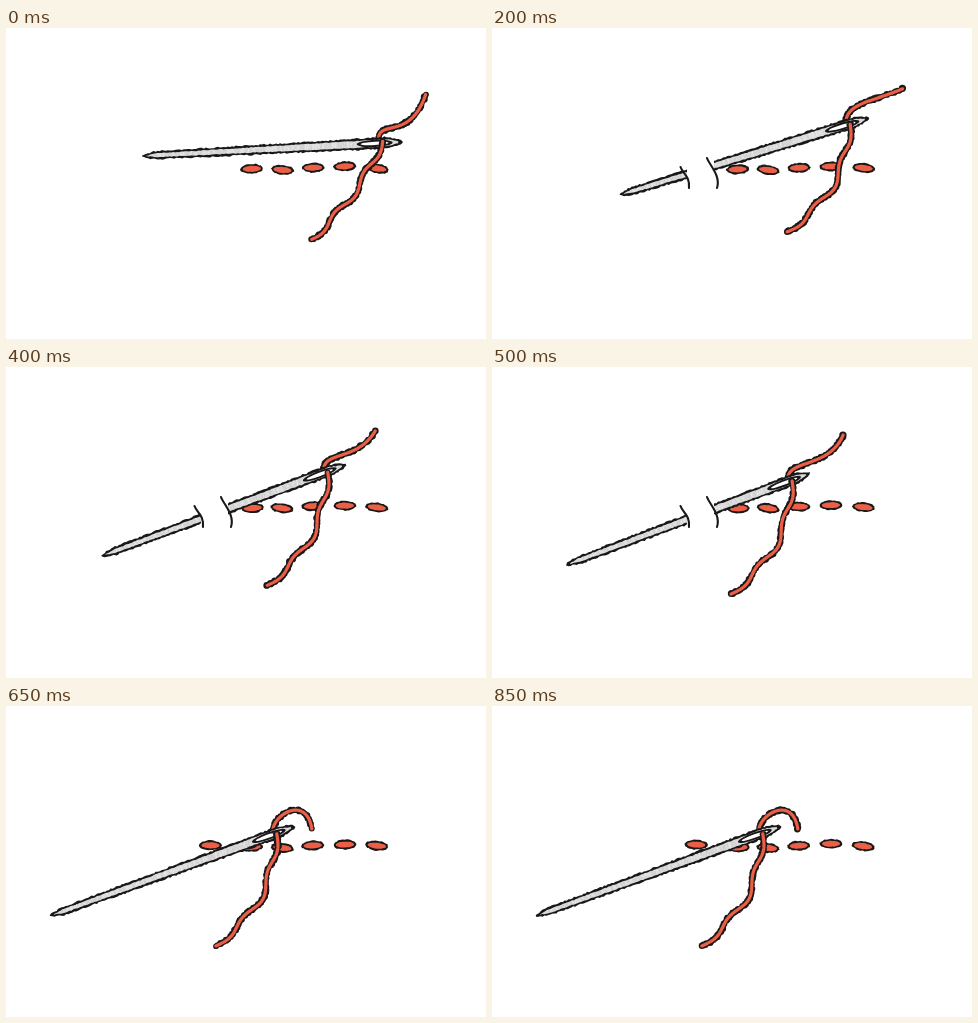
Recreate the animation shown at these times as an HTML page with a canvas. Size 480 by 311 pixels, loop 900 ms.

```html
<!DOCTYPE html>
<html lang="en">
<head>
<meta charset="utf-8">
<title>Needle and thread</title>
<style>
  html, body { margin: 0; width: 100%; height: 100%; overflow: hidden; background: #fff; }
  canvas { display: block; width: 480px; height: 311px; }
</style>
</head>
<body>
<canvas id="stage" width="480" height="311"></canvas>
<script>
const ctx = document.getElementById('stage').getContext('2d');
const LOOP = 900, STEP = 50, LEN = 261, EYE = 233, GAP = [195, 222];
const INK = '#191717', RED = '#ea5f46', STEEL = '#dadada';

// needle: tip x, tip y, angle
// tail: bend x, y and end x, y of the upper thread, seen from the eye
// hang: end x, y and sag of the lower thread
const poses = [
  { at: 0, needle: [136, 128, -3.1], tail: [32, 2, 47, -43], hang: [-71, 98, 7] },
  { at: 100, needle: [138, 154, -13.9], tail: [28, -32, 65, -30], hang: [-66, 102, 16] },
  { at: 300, needle: [117, 180, -20.4], tail: [26, -6, 48, -33], hang: [-60, 113, 16] },
  { at: 500, needle: [74, 198, -20.6], tail: [42, -10, 55, -42], hang: [-61, 113, 16] },
  { at: 600, needle: [44, 210, -20.1], tail: [34, -34, 39, -1], hang: [-61, 112, 16] }
];

let seed = 1;
function rand() {
  seed = (seed * 1664525 + 1013904223) >>> 0;
  return seed / 4294967296;
}
const wobble = a => (rand() * 2 - 1) * a;
const rad = deg => deg * Math.PI / 180;
const sample = (n, f) => Array.from({ length: n + 1 }, (_, i) => f(i / n));

function poseAt(t) {
  let i = 0;
  while (i < poses.length - 2 && t >= poses[i + 1].at) i++;
  const a = poses[i], b = poses[i + 1];
  const k = Math.min(1, (t - a.at) / (b.at - a.at));
  const mix = key => a[key].map((v, j) => v + (b[key][j] - v) * k);
  return { needle: mix('needle'), tail: mix('tail'), hang: mix('hang') };
}

function trace(points) {
  ctx.beginPath();
  points.forEach(([x, y]) => ctx.lineTo(x, y));
}

function fillShape(points, color) {
  ctx.fillStyle = color;
  trace(points);
  ctx.fill();
}

function thread(points) {
  ctx.fillStyle = INK;
  ctx.beginPath();
  for (const [x, y] of points) {
    const r = 3.1 + wobble(.6), cx = x + wobble(.5), cy = y + wobble(.5);
    ctx.moveTo(cx + r, cy);
    ctx.arc(cx, cy, r, 0, 7);
  }
  ctx.fill();
  ctx.strokeStyle = RED;
  ctx.lineWidth = 3.2;
  ctx.lineCap = ctx.lineJoin = 'round';
  trace(points);
  ctx.stroke();
}

// cubic curve that leaves the eye upwards
function tailPath(x, y, [bx, by, ex, ey]) {
  return sample(50, s => {
    const r = 1 - s, p = 3 * r * r * s, q = 3 * r * s * s, c = s * s * s;
    return [x + p * 2 + q * bx + c * ex, y - p * 17 + q * by + c * ey];
  }).reverse();
}

// straight line with a sag and a ripple across it
function hangPath(x, y, [dx, dy, sag]) {
  const len = Math.hypot(dx, dy);
  return sample(90, s => {
    const side = sag * Math.sin(Math.PI * s) + 3 * Math.sin(5 * Math.PI * s);
    return [x + dx * s + side * dy / len, y + dy * s - side * dx / len];
  });
}

function stitch(x, y, deg) {
  const ring = (rx, ry, rough) => sample(32, s => {
    const a = s * 2 * Math.PI;
    return [rx * Math.cos(a) + wobble(rough), ry * Math.sin(a) + wobble(rough)];
  });
  ctx.save();
  ctx.translate(x + wobble(.6), y + wobble(.5));
  ctx.rotate(rad(deg + wobble(2)));
  fillShape(ring(11.4, 4.9, .5), INK);
  fillShape(ring(9.1, 3, .2), RED);
  ctx.restore();
}

function stitches(done) {
  for (let i = 0; i < 5; i++) {
    stitch(246 + 29.5 * i + .45 * i * i,
      140 + 1.8 * Math.cos(1.4 * (i - .6)),
      1.5 + 6 * Math.cos(rad(120 * (i - 1))));
  }
  if (done) stitch(204, 139, 1);
}

function halfWidth(x) {
  const tip = Math.min(1, x / 14), end = Math.min(1, (LEN - x) / 18);
  return (4 + 2 * x / LEN) * Math.sqrt(tip * end);
}

function needleBody(inset, rough) {
  const edge = side => sample(130, s => {
    const x = inset * 2 + s * (LEN - inset * 4);
    return [x, side * Math.max(.3, halfWidth(x) - inset) + wobble(rough)];
  });
  return edge(-1).concat(edge(1).reverse());
}

// fine pencil lines across the steel
function shade() {
  ctx.lineWidth = .7;
  for (let x = 14; x < 212; x += 2.5) {
    const h = halfWidth(x) - 2.5;
    ctx.strokeStyle = rand() < .5 ? '#c6c6c6' : '#f0f0f0';
    ctx.beginPath();
    ctx.moveTo(x + wobble(1), -h * rand());
    ctx.lineTo(x + wobble(1), h * rand());
    ctx.stroke();
  }
}

function eyeShape(rx, ry, color) {
  ctx.fillStyle = color;
  ctx.beginPath();
  ctx.ellipse(EYE, 0, rx, ry, 0, 0, 7);
  ctx.fill();
}

function needle([x, y, deg], pierced, strand) {
  ctx.save();
  if (pierced) {
    ctx.beginPath();
    ctx.rect(0, 0, GAP[0], 311);
    ctx.rect(GAP[1], 0, 480, 311);
    ctx.clip();
  }
  ctx.translate(x, y);
  ctx.rotate(rad(deg));
  fillShape(needleBody(0, .7), INK);
  fillShape(needleBody(2.2, .35), STEEL);
  shade();
  eyeShape(18, 3.6, INK);
  eyeShape(14, 1.7, '#fff');
  ctx.clip();
  ctx.setTransform(1, 0, 0, 1, 0, 0);
  thread(strand);
  ctx.restore();
}

function cloth() {
  ctx.strokeStyle = INK;
  ctx.lineWidth = 2.1;
  ctx.lineCap = 'round';
  ctx.beginPath();
  ctx.moveTo(188.5, 139);
  ctx.bezierCurveTo(191, 146, 198, 148, 197, 160);
  ctx.moveTo(215, 130);
  ctx.bezierCurveTo(218, 138, 229, 148, 225, 160);
  ctx.stroke();
}

function draw(t) {
  seed = 97 + t * 7919;
  const pose = poseAt(t), [x, y, deg] = pose.needle;
  const eyeX = x + EYE * Math.cos(rad(deg)), eyeY = y + EYE * Math.sin(rad(deg));
  const hang = hangPath(eyeX + 8, eyeY - 2, pose.hang);
  const strand = [...tailPath(eyeX + 4, eyeY - 6, pose.tail), hang[0]];
  const done = t >= 600, pierced = t >= 200 && !done;

  ctx.fillStyle = '#fff';
  ctx.fillRect(0, 0, 480, 311);
  stitches(done);
  thread(strand);
  needle(pose.needle, pierced, strand);
  if (pierced) cloth();
  thread(hang);
}

let shown = -1;
function tick() {
  const now = performance.now() % LOOP;
  const t = now < 100 ? 0 : Math.floor(now / STEP) * STEP;
  if (t !== shown) draw(shown = t);
  requestAnimationFrame(tick);
}
tick();
</script>
</body>
</html>
```
